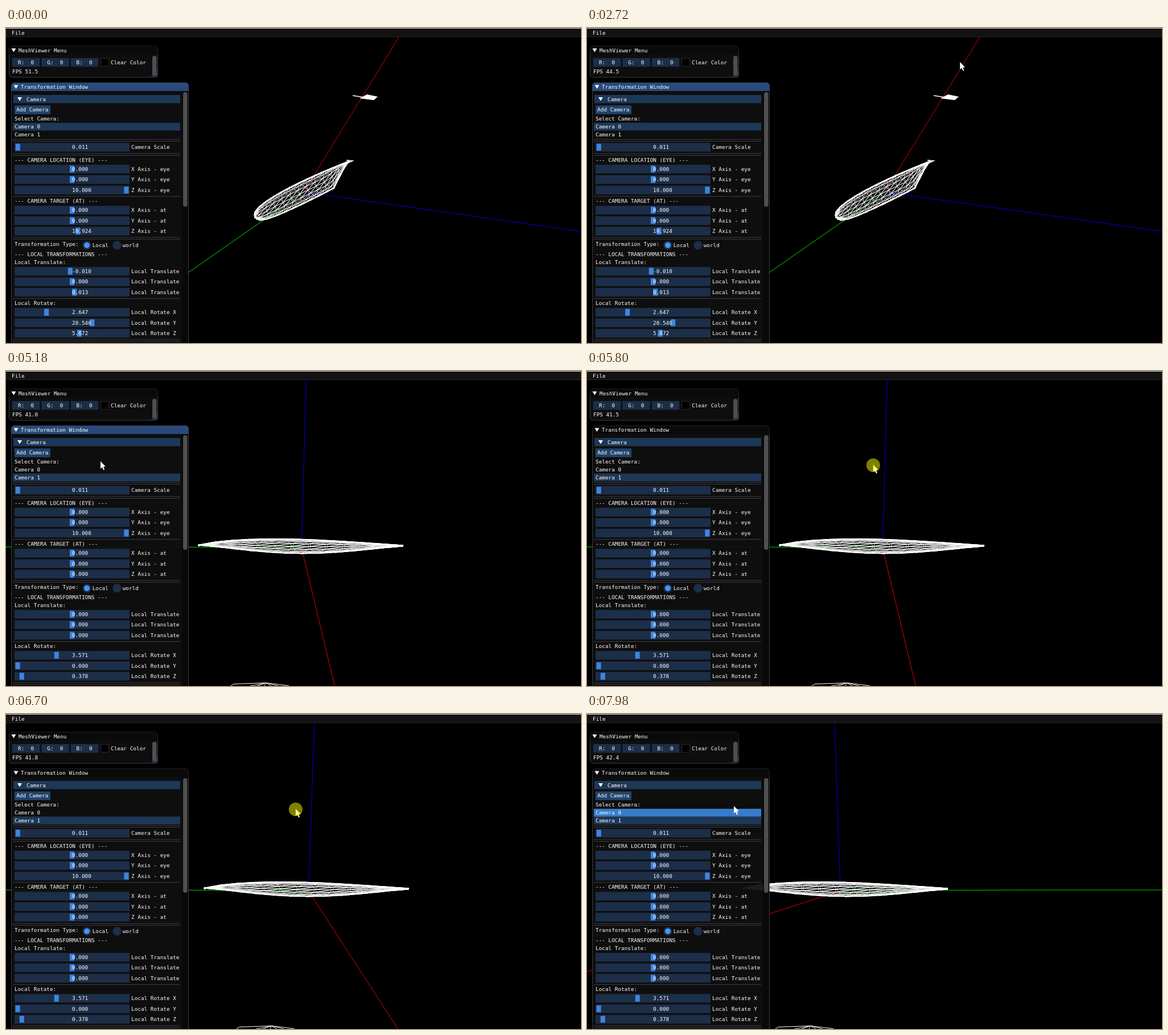
Recreate the animation shown at these times as an HTML page with a canvas. Size 1010x555 px, loop 8 s.

```html
<!DOCTYPE html>
<html lang="en">
<head>
<meta charset="utf-8">
<title>Mesh viewer</title>
<style>
html, body { margin: 0; width: 100%; height: 100%; overflow: hidden; background: #000; }
canvas { display: block; }
</style>
</head>
<body>
<canvas id="stage" width="1010" height="555"></canvas>
<script>
const g = document.getElementById('stage').getContext('2d');
const LOOP = 8000, SWITCH = 4000, PRESS = 5780, RELEASE = 7600;

// Interface metrics, all from one scale
const S = .8035, LINE = 13 * S, BOX = 19 * S, GAP = 4 * S;
const LEFT = 15, RIGHT = 306, TRACK = 202, GRAB = 10 * S;

// Keys: [time, values...]
const CURSOR = [
  [70, 928, 522], [840, 738, 110], [1250, 660, 60], [1590, 610, 153], [2150, 704, 44],
  [2740, 655, 60], [3050, 520, 230], [3340, 260, 290], [3780, 112, 185], [4350, 112, 185],
  [4970, 148, 172], [5180, 166, 159], [5700, 502.7, 165], [5940, 502.7, 165], [6140, 516.4, 164],
  [6320, 522, 165], [7090, 495, 169], [RELEASE, 475.9, 171], [7980, 258, 162]];
const FPS = [[0, 51.5], [1590, 46], [3820, 43], [5180, 41], [6140, 41.7], [7090, 41.8], [7980, 42.4]];
const ORIGIN_BY_YAW = [[-72, 445], [-11, 508], [13, 519], [57, 547]];

const clamp = (v, lo = 0, hi = 1) => Math.min(hi, Math.max(lo, v));
const smooth = k => k * k * (3 - 2 * k);
const linear = k => k;
const within = (v, a, b) => v >= a && v < b;

function at(keys, t, ease = smooth) {
  const i = clamp(keys.findIndex(k => k[0] > t), 0, keys.length);
  if (t >= keys[keys.length - 1][0]) return keys[keys.length - 1].slice(1);
  if (i === 0) return keys[0].slice(1);
  const a = keys[i - 1], b = keys[i], k = ease((t - a[0]) / (b[0] - a[0]));
  return a.slice(1).map((v, j) => v + (b[j + 1] - v) * k);
}

const blue = a => `rgba(66,150,250,${a})`;
const FRAME = 'rgba(41,74,122,.54)', PANEL = 'rgba(15,15,15,.94)', EDGE = 'rgba(110,110,128,.5)';

function rect(x, y, w, h, color) { g.fillStyle = color; g.fillRect(x, y, w, h); }
function round(x, y, w, h, r, fill, stroke) {
  g.beginPath(); g.roundRect(x, y, w, h, r);
  g.fillStyle = fill; g.fill();
  if (stroke) { g.strokeStyle = stroke; g.lineWidth = 1; g.stroke(); }
}
function disc(x, y, r, color) {
  g.beginPath(); g.arc(x, y, r, 0, 7); g.fillStyle = color; g.fill();
}
function path(points, stroke, width = 1) {
  g.beginPath(); points.forEach(p => g.lineTo(...p));
  g.strokeStyle = stroke; g.lineWidth = width; g.stroke();
}
function shape(points, fill) {
  g.beginPath(); points.forEach(p => g.lineTo(...p));
  g.closePath(); g.fillStyle = fill; g.fill();
}
function text(s, x, y, align = 'left') {
  g.textAlign = align; g.fillStyle = '#fff'; g.fillText(s, x, y + 3.3);
}
const arrow = (x, y) => shape([[x, y], [x + 8, y], [x + 4, y + 6.5]], '#fff');

// Triangulated shell seen from the side; place(u, offset) maps it to the screen
function shell(place, above, below, rings = 12, sectors = 8) {
  for (const side of [-1, 1]) {
    const p = (i, k) => {
      const v = (1 - Math.cos(Math.PI * k / sectors)) / 2;
      const u = clamp(i / rings + side * .04 * Math.sin(Math.PI * v));
      return place(u, -above(u) * (1 - v) + below(u) * v);
    };
    for (let i = 0; i < rings; i++)
      for (let k = 0; k < sectors; k++)
        path([p(i, k + 1), p(i, k), p(i + 1, k), p(i, k + 1)], '#fff', .8);
  }
  const us = Array.from({ length: 41 }, (_, i) => i / 40);
  path(us.map(u => place(u, 1 - above(u))), '#fff', 2.4);
  path(us.map(u => place(u, below(u) - 1)), '#fff', 2.4);
}

function firstView() {
  const o = [523, 289];
  path([o, [690, 16]], '#d00000');
  path([o, [0, 655]], '#00d800');
  path([o, [1010, 358.5]], '#0000e0');
  shell((u, d) => [437 + 166 * u + .516 * d, 334 - 100 * u + .857 * d],
    u => 33 * u ** .35 * (1 - u),
    u => 31 * u ** .33 * Math.min(1, ((1 - u) / .25) ** 1.2));
  path([[598, 233], [609, 234], [600, 238]], '#fff', 1.5);
  path([[609, 119], [628, 122]], '#fff', 1.6);
  shape([[621, 124], [634, 117], [653, 121], [646, 127]], '#fff');
}

function secondView(t) {
  const yaw = (at(CURSOR, clamp(t, 5700, RELEASE))[0] - 498.5) * 3.2, a = yaw * Math.PI / 180;
  const [ox] = at(ORIGIN_BY_YAW, yaw, linear), left = ox - 180 - .12 * yaw, low = left + 57;
  path([[ox, 311], [ox + 10 * Math.tanh(yaw / 13), 16]], '#0000e0');
  path([[ox, 312], [ox + 1500 * Math.sin(a), 312 + 1500 * Math.cos(a)]], '#e00000');
  path([[ox, 310.5], [yaw < -45 ? 1010 : 0, 310]], '#00c800', 1.2);
  shell((u, d) => [left + 360 * u, 307 + d],
    u => 11.5 * Math.sin(Math.PI * u ** .7),
    u => 14 * Math.max(0, Math.sin(Math.PI * u)) ** 1.2 + 2 * u);
  path([[low, 555], [low + 5, 551.5], [low + 62, 549.5], [low + 102, 554.5]], '#fff');
  for (let x = 34; x < 90; x += 12.5) path([[low + 62, 549.5], [low + x, 555]], '#fff', .9);
}

function titleBar(x, y, w, label, color) {
  round(x, y, w, 14.5, [5, 5, 0, 0], color);
  arrow(x + 4, y + 4);
  text(label, x + 16.5, y + 7.2);
}

function menuPanel(t) {
  round(5.5, 32, 261, 55, 5, PANEL, EDGE);
  titleBar(5.5, 32, 261, 'MeshViewer Menu', '#0a0a0a');
  ['R', 'G', 'B'].forEach((c, i) => {
    const x = 11 + i * 51.3;
    rect(x, 53, 48.5, BOX, FRAME);
    text(c + ':  0', x + 10, 61);
  });
  round(166.5, 53.5, 14, 14, 0, '#000', '#2a2a2e');
  text('Clear Color', 184, 61);
  text('FPS ' + at(FPS, t)[0].toFixed(1), 11, 77);
  shape([[266, 74], [266, 86], [254, 86]], blue(.25));
  round(257, 49, 7.5, 35, 4, '#4f4f4f');
}

function transformPanel(t) {
  const second = t >= SWITCH, [cx, cy] = at(CURSOR, t);
  let y = 118;

  const line = s => { text(s, LEFT, y + LINE / 2); y += LINE + GAP; };
  const rules = n => { while (n--) { rect(12, y - .2, RIGHT - 12, 1, EDGE); y += GAP; } };
  const slider = (label, value, min, max) => {
    const k = clamp((value - min) / (max - min)), mid = y + BOX / 2;
    rect(LEFT, y, TRACK, BOX, FRAME);
    rect(LEFT + 1.6 + k * (TRACK - 3.2 - GRAB), y + 1.6, GRAB, BOX - 3.2, '#3d85e0');
    text(value.toFixed(3), LEFT + TRACK / 2, mid);
    text(label, 220, mid);
    y += BOX + GAP;
  };
  const cameraRow = (name, selected) => {
    const top = y - GAP / 2, height = LINE + GAP;
    const hovered = t > 70 && cx < RIGHT && within(cy + 8, top, top + height);
    const pressed = within(t, 3800, SWITCH);
    const alpha = hovered ? (pressed ? 1 : .8) : selected ? .31 : 0;
    rect(12, top, RIGHT - 12, height, blue(alpha));
    line(name);
  };
  const radio = (label, x, on) => {
    disc(x, y + BOX / 2, BOX / 2, FRAME);
    if (on) disc(x, y + BOX / 2, 5, blue(1));
    text(label, x + 9.7, y + BOX / 2);
  };
  const axes = (label, values, min, max) =>
    values.forEach((v, i) => slider(label('XYZ'[i]), v, min, max[i] ?? max));

  round(9.5, 96.5, 311, 470, 5, PANEL, EDGE);
  titleBar(9.5, 96.5, 311, 'Transformation Window', t < PRESS ? '#294a7a' : '#0a0a0a');

  rect(13, y, RIGHT - 13, BOX - .8, blue(.31));
  arrow(20, y + 4);
  text('Camera', 36, y + BOX / 2);
  y += BOX + GAP;
  rect(LEFT, y, 63, BOX, blue(.4));
  text('Add Camera', LEFT + GAP, y + BOX / 2);
  y += BOX + GAP;
  line('Select Camera:');
  cameraRow('Camera 0', !second);
  cameraRow('Camera 1', second);
  rules(2);
  slider('Camera Scale', .011, .01, 1);
  rules(2);
  line('--- CAMERA LOCATION (EYE) ---');
  axes(c => c + ' Axis - eye', [0, 0, 10], -10, 10);
  rules(1);
  line('--- CAMERA TARGET (AT) ---');
  axes(c => c + ' Axis - at', [0, 0, second ? 0 : 10.924], -100, 100);
  rules(2);
  text('Transformation Type:', LEFT, y + LINE / 2);
  radio('Local', 142, true);
  radio('world', 195, false);
  y += BOX + GAP;
  line('--- LOCAL TRANSFORMATIONS ---');
  line('Local Translate:');
  axes(() => 'Local Translate', second ? [0, 0, 0] : [-.01, 0, .013], -.3, .3);
  rules(1);
  line('Local Rotate:');
  axes(c => 'Local Rotate ' + c, second ? [3.571, 0, .378] : [2.647, 20.546, 5.672], 0, [10, 30, 10]);
  rules(2);

  rect(309, 111, 11, 444, 'rgba(5,5,5,.53)');
  round(311, 113, 7.5, 202, 4, '#4f4f4f');
}

function pointer(t) {
  if (t < 70) return;
  const [x, y] = at(CURSOR, t);
  shape([[0, 0], [0, 13], [3, 10.4], [5.2, 15.4], [7.2, 14.5], [5, 9.7], [8.8, 9.3]]
    .map(([dx, dy]) => [x + dx, y + dy]), '#fff');
  if (within(t, PRESS, RELEASE)) disc(x, y + 1, 12, 'rgba(255,255,0,.5)');
}

function draw(t) {
  g.font = '9.35px "DejaVu Sans Mono", monospace';
  rect(0, 0, 1010, 555, '#000');
  if (t < SWITCH) firstView(); else secondView(t);
  rect(0, 0, 1010, 15.5, '#121212');
  rect(0, 0, 1010, 1, '#d8d8d8');
  rect(0, 15, 1010, 1, '#242428');
  text('File', 10, 9);
  menuPanel(t);
  transformPanel(t);
  pointer(t);
}

let start;
function tick(now) {
  start ??= now;
  draw((now - start) % LOOP);
  requestAnimationFrame(tick);
}
draw(0);
requestAnimationFrame(tick);
</script>
</body>
</html>
```
